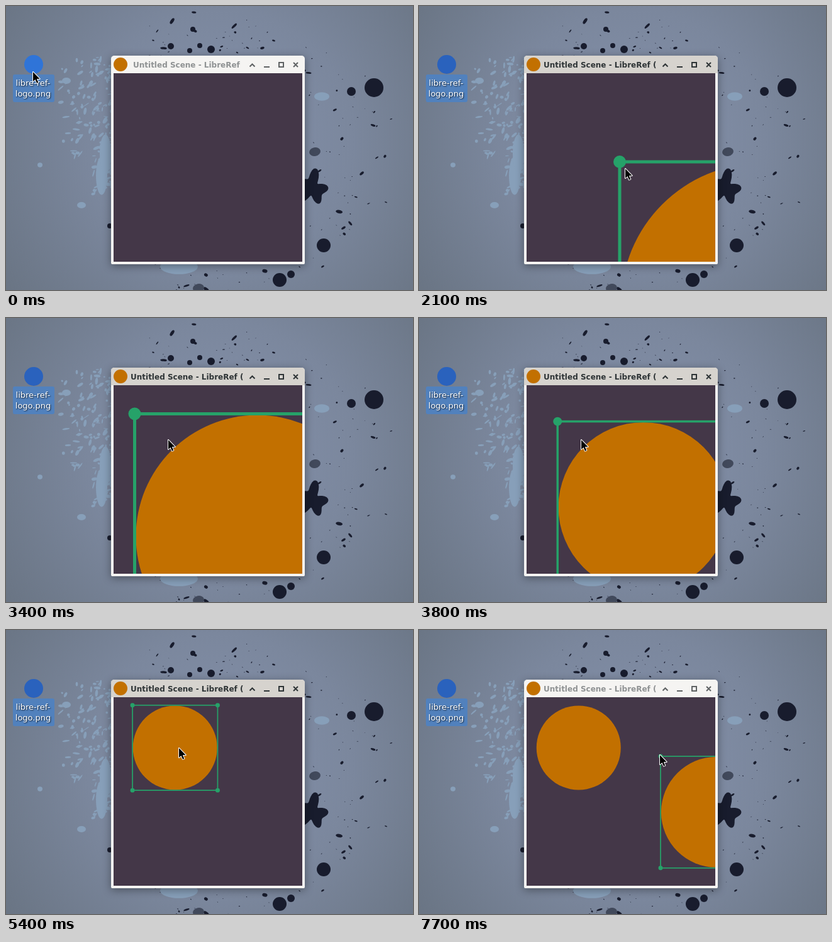
Animation of 647 by 452 pixels, one loop 8 s. Source, as an HTML page with a canvas:

```html
<!DOCTYPE html>
<html lang="en">
<head>
<meta charset="utf-8">
<title>Drag and drop demo</title>
<style>
html, body { margin: 0; height: 100%; overflow: hidden; background: #75819a; }
canvas { display: block; }
</style>
</head>
<body>
<canvas id="stage" width="647" height="452"></canvas>
<script>
const W = 647, H = 452, LOOP = 8000, STEP = 100;
const ORANGE = '#c27000', GREEN = '#26a269', DARK = '#181c2d', PALE = '#879fb9';
const ctx = document.getElementById('stage').getContext('2d');

// Pointer moves: [start, end, x, y]; it rests between them.
const home = [42, 104];
const moves = [
  [100, 900, 288, 215], [1200, 1400, 303, 223], [1400, 1600, 290, 217], [1800, 2400, 364, 299],
  [2600, 3000, 252, 214], [3000, 3200, 219, 173], [3200, 3400, 257, 193], [3900, 4000, 325, 264],
  [4400, 4500, 346, 282], [4500, 5400, 274, 187], [5400, 5500, 259, 187], [5500, 6300, ...home],
  [6400, 6600, 383, 200], [6800, 7200, 457, 215], [7200, 7700, 382, 198]
];

const ramp = (t, a, b) => Math.min(1, Math.max(0, (t - a) / (b - a)));

function pointerAt(t) {
  return moves.reduce(([x, y], [a, b, toX, toY]) => {
    const p = ramp(t, a, b);
    return [x + (toX - x) * p, y + (toY - y) * p];
  }, home);
}

// The picture is resized about its centre, then follows the pointer's pans and zooms.
function pictureAt(t) {
  let size = 512 - 122 * ramp(t, 1800, 2400), zoom = 1;
  let x = 544.5 - size / 2, y = 473.5 - size / 2;
  const pan = (a, b) => {
    const [fromX, fromY] = pointerAt(a), [toX, toY] = pointerAt(Math.min(b, Math.max(a, t)));
    x += toX - fromX;
    y += toY - fromY;
  };
  const zoomAround = ([px, py], k) => {
    x = px + (x - px) * k;
    y = py + (y - py) * k;
    size *= k;
    zoom *= k;
  };
  pan(2600, 3200);
  zoomAround(pointerAt(3400), .7 + .3 * (1 - ramp(t, 3400, 3800)) ** 2);
  zoomAround(pointerAt(4000), 1 - .504 * ramp(t, 3900, 4400));
  pan(4500, 5500);
  return { x, y, size, zoom };
}

function ellipse(c, x, y, rx, ry, color, tilt = 0) {
  c.fillStyle = color;
  c.beginPath();
  c.ellipse(x, y, rx, ry, tilt, 0, 7);
  c.fill();
}

const disc = (x, y, r, color) => ellipse(ctx, x, y, r, r, color);

function roundRect(x, y, w, h, r, color) {
  ctx.fillStyle = color;
  ctx.beginPath();
  ctx.roundRect(x, y, w, h, r);
  ctx.fill();
}

function makeWallpaper() {
  const canvas = document.createElement('canvas');
  canvas.width = W;
  canvas.height = H;
  const c = canvas.getContext('2d');
  const glow = c.createRadialGradient(340, 215, 0, 340, 215, 420);
  glow.addColorStop(0, '#8491ab');
  glow.addColorStop(.5, '#7b879d');
  glow.addColorStop(1, '#697483');
  c.fillStyle = glow;
  c.fillRect(0, 0, W, H);

  let seed = 11;
  const rnd = () => (seed = (seed * 16807) % 2147483647) / 2147483647;
  const range = (a, b) => a + (b - a) * rnd();

  // Pale spray, denser toward the window
  for (let i = 0; i < 190; i++) {
    const y = range(82, 300), reach = y < 240 ? 82 : 30;
    ellipse(c, 168 - reach * rnd() ** 1.6, y, range(1, 6), range(.6, 2.6), PALE, range(-1.6, .2));
  }
  for (const [x, y, r] of [[152, 270, 9], [158, 235, 9]]) ellipse(c, x, y, r, r * 3.4, PALE);
  for (const [x, y, r] of [[120, 317, 7], [54, 253, 4], [96, 119, 7], [275, 415, 30], [502, 144, 12]])
    ellipse(c, x, y, r, r ** .7 + 1, PALE);

  // Dark specks around the right half, mostly tiny
  for (let i = 0; i < 170; i++) {
    const a = range(-2.1, 2.1), r = .5 + 3 * rnd() ** 4;
    ellipse(c, 330 + Math.cos(a) * range(150, 295), 235 + Math.sin(a) * range(150, 228),
      r * range(1, 2.2), r * range(.5, 1), DARK, range(-1, 1));
  }
  const blots = [
    [585, 130, 15], [549, 136, 7], [505, 381, 11], [435, 436, 11], [453, 427, 6],
    [297, 37, 4], [262, 64, 5], [292, 71, 4], [308, 63, 4], [326, 69, 6], [165, 350, 4]
  ];
  for (const [x, y, r] of blots) ellipse(c, x, y, r, r, DARK);
  for (const [x, y] of [[491, 232], [306, 449]]) ellipse(c, x, y, 9, 7, '#41495b', -.2);

  // Spiky splash beside the window
  c.fillStyle = DARK;
  c.beginPath();
  for (let a = 0; a < 6.28; a += .1) {
    const r = 20 + 6 * Math.sin(5 * a + 2) + 4 * Math.sin(3 * a);
    c.lineTo(487 + r * Math.cos(a), 290 + r * 1.1 * Math.sin(a));
  }
  c.fill();
  return canvas;
}

const wallpaper = makeWallpaper();

function drawDesktopIcon(hover) {
  disc(44, 93, 15, hover ? '#2f74d8' : '#2a62bd');
  roundRect(11, 109, 66, 44, 3, '#5181bd');
  ctx.save();
  ctx.font = '13px "DejaVu Sans", sans-serif';
  ctx.textAlign = 'center';
  ctx.fillStyle = '#fff';
  ctx.shadowColor = 'rgba(0,0,0,.8)';
  ctx.shadowBlur = 2;
  ctx.shadowOffsetX = ctx.shadowOffsetY = 1;
  ctx.fillText('libre-ref-', 43, 127);
  ctx.fillText('logo.png', 43, 144);
  ctx.restore();
}

function drawWindow(active, loaded) {
  ctx.save();
  ctx.shadowColor = 'rgba(0,0,0,.38)';
  ctx.shadowBlur = 14;
  ctx.shadowOffsetY = 3;
  roundRect(167, 79, 308, 332, [5, 5, 2, 2], '#f5f4f2');
  ctx.restore();
  if (active) roundRect(167, 79, 308, 28, [5, 5, 0, 0], '#d6d3ce');
  disc(182, 93, 11, ORANGE);
  ctx.font = 'bold 12px "DejaVu Sans", sans-serif';
  ctx.fillStyle = active ? '#2e3436' : '#8f9293';
  ctx.fillText('Untitled Scene - LibreRef' + (loaded ? ' (' : ''), loaded ? 198 : 202, 98);

  ctx.strokeStyle = active ? '#2e3436' : '#5f6263';
  ctx.lineWidth = 2;
  ctx.stroke(new Path2D('M387.5 96.5l4-4 4 4M410 97h9M434 90h7v7h-7zM457 90l7 7M464 90l-7 7'));
  ctx.fillStyle = '#443748';
  ctx.fillRect(171, 107, 300, 300);
}

function drawPicture({ x, y, size, zoom }, selected) {
  disc(x + size / 2, y + size / 2, size * .495, ORANGE);
  if (!selected) return;
  ctx.strokeStyle = GREEN;
  ctx.lineWidth = 5 * zoom;
  ctx.strokeRect(x, y, size, size);
  for (const dx of [0, size])
    for (const dy of [0, size]) disc(x + dx, y + dy, 10 * zoom, GREEN);
}

function drawScene(t) {
  if (t < 1000) return;
  const picture = pictureAt(t), copied = t >= 6800;
  ctx.save();
  ctx.beginPath();
  ctx.rect(171, 107, 300, 300);
  ctx.clip();
  drawPicture(picture, !copied);
  if (copied) drawPicture({ x: 384, y: 201, size: 512 * picture.zoom, zoom: picture.zoom }, true);
  ctx.restore();
}

const arrow = new Path2D('M1 1V16L4.5 13 7 18.7 9.3 17.7 6.9 12H11.7Z');
const fist = new Path2D('M-4-2L-2-4H4L5-1 4 3H-3L-4 1Z');
const plus = new Path2D('M8 4h2v3h3v2h-3v3h-2v-3h-3v-2h3z');

function outlined(path, fill, stroke) {
  ctx.lineJoin = 'round';
  ctx.lineWidth = 2;
  ctx.strokeStyle = stroke;
  ctx.stroke(path);
  ctx.fillStyle = fill;
  ctx.fill(path);
}

function drawPointer([x, y], dragging) {
  ctx.save();
  ctx.translate(x, y);
  if (dragging) {
    disc(11, 16, 14.5, ORANGE);
    outlined(fist, '#fff', '#000');
    outlined(plus, '#fff', '#000');
  } else {
    outlined(arrow, '#000', '#fff');
  }
  ctx.restore();
}

function draw(now) {
  const t = Math.floor(now % LOOP / STEP) * STEP;
  const within = (a, b) => t >= a && t < b;
  const pointer = pointerAt(t);
  ctx.drawImage(wallpaper, 0, 0);
  drawDesktopIcon(Math.hypot(pointer[0] - home[0], pointer[1] - home[1]) < 25);
  drawWindow(within(1800, 6200), t >= 1000);
  drawScene(t);
  drawPointer(pointer, within(100, 1000) || within(6400, 6800));
}

const start = performance.now();
function tick() {
  draw(performance.now() - start);
  requestAnimationFrame(tick);
}
tick();
</script>
</body>
</html>
```
